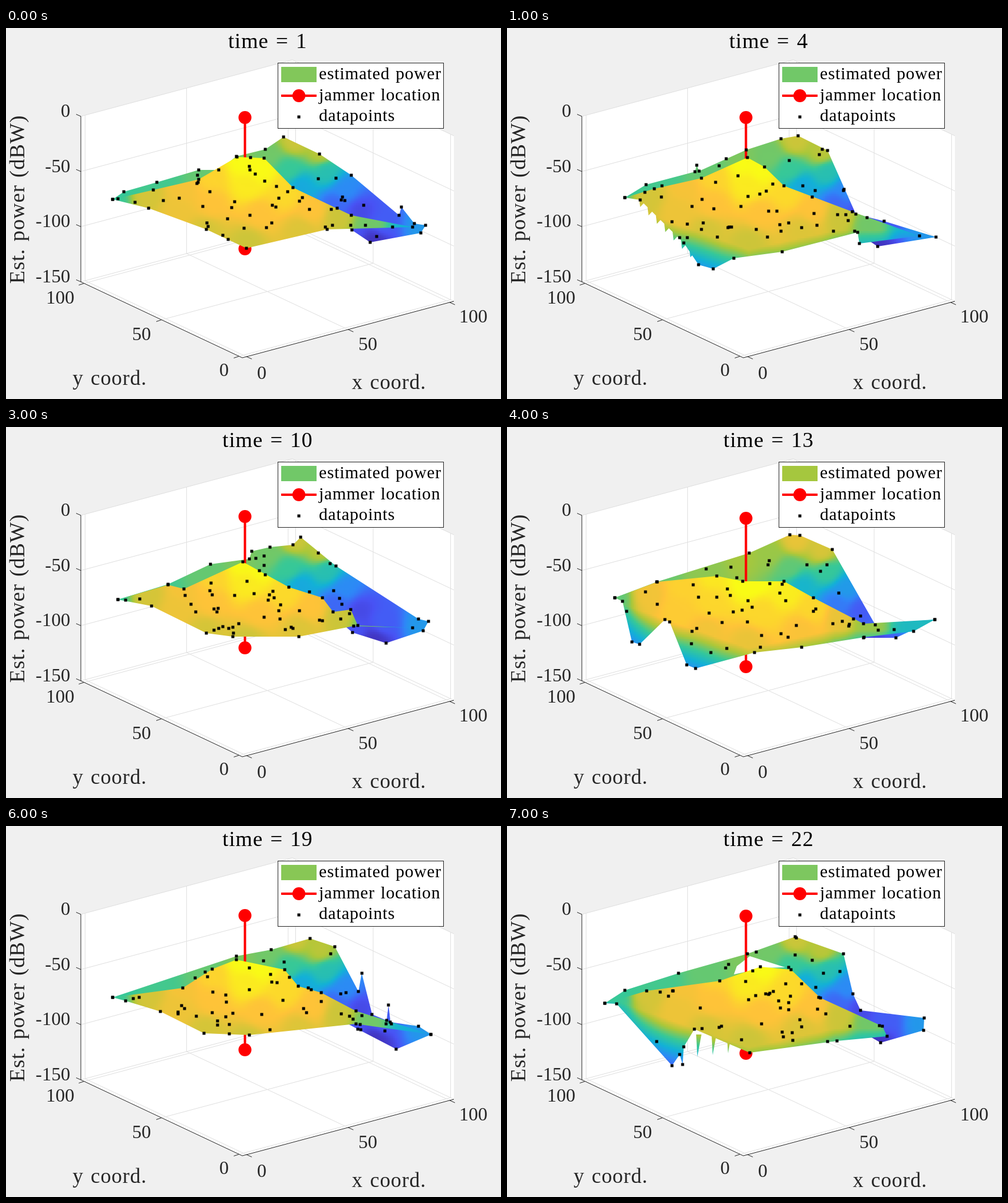
An HTML page with a canvas for the animation above (8 s loop, 840x630 px).

```html
<!DOCTYPE html>
<html lang="en">
<head>
<meta charset="utf-8">
<title>Estimated power over time</title>
<style>
html, body { margin: 0; height: 100%; overflow: hidden; background: #f0f0f0; }
canvas { display: block; }
</style>
</head>
<body>
<canvas id="stage" width="840" height="630"></canvas>
<script>
const ctx = document.getElementById('stage').getContext('2d');
const STEP = 1000, JAMMER_X = 405.5, CELL = 3;
const scenes = [];

// Outlines are flat [x, y, ...] lists, clockwise from the left corner.
function scene(time, back, front, options) {
  scenes.push({ time, back, front, patch: 4.5, top: 152, base: 375, warmth: 0, ...options });
}

// A neighbouring measurement: an earlier outline stretched about the jammer.
function stretched(time, from, left, right, options) {
  const warp = (v, i) => i % 2 ? v : JAMMER_X + (v - JAMMER_X) * (v < JAMMER_X ? left : right);
  scene(time, from.back.map(warp), from.front.map(warp), options);
}

scene(1,
  [181,291, 200,278, 256,262, 327,241, 361,241, 391,218, 440,206, 471,185, 532,214, 586,250, 667,318, 671,304,
    693,332, 712,335, 704,348, 618,364],
  [181,291, 250,275, 327,257, 392,219, 438,221, 487,271, 586,318, 690,338, 545,342, 408,374, 340,342, 242,306],
  { patch: 4.65 });
scene(4,
  [200,288, 236,266, 319,244, 322,233, 326,243, 406,207, 465,188, 494,183, 544,208, 592,316, 640,328, 728,355,
    629,371, 590,345],
  [200,288, 250,273, 330,255, 408,220, 437,236, 470,268, 586,312, 700,353, 598,366, 595,347, 467,380, 385,391,
    350,409, 325,402, 300,365, 226,292],
  { teeth: { x: 226, y: 304, dx: 14.2, dy: 14.2, count: 7, length: 16, width: 15 } });
scene(10,
  [190,293, 275,267, 347,233, 413,224, 417,211, 448,204, 487,200, 500,187, 560,236, 700,326, 717,330, 708,346,
    645,367, 588,349],
  [190,293, 275,268, 302,275, 402,229, 480,272, 537,290, 555,314, 585,310, 597,337, 690,341, 590,338, 497,356,
    385,356, 340,350, 247,304]);
scene(13,
  [183,290, 254,263, 411,214, 480,183, 497,184, 552,208, 625,336, 726,327, 660,358, 605,358],
  [183,290, 255,263, 356,253, 400,262, 470,262, 520,290, 605,334, 726,327, 690,347, 606,357, 500,374, 420,383,
    320,410, 305,404, 276,331, 268,327, 225,369, 212,365, 196,296],
  { patch: 4.95, top: 155, base: 407, warmth: .35 });
scene(16,
  [181,291, 391,221, 446,210, 505,191, 543,205, 579,281, 584,250, 600,320, 622,330, 625,304, 628,333, 671,340,
    690,354, 637,379, 578,345],
  [181,291, 300,275, 350,243, 391,227, 466,244, 487,272, 522,283, 575,314, 690,354, 575,336, 412,355, 336,352,
    262,315, 203,297],
  { patch: 4.85, base: 378 });
scene(22,
  [166,301, 200,279, 291,250, 408,217, 489,188, 571,217, 587,285, 600,313, 708,326, 707,347, 634,368],
  [166,301, 237,280, 361,263, 430,239, 482,244, 532,292, 637,340, 645,357, 560,365, 412,385, 318,345, 300,375,
    298,405, 293,388, 280,407, 186,302],
  { patch: 4.6, top: 153, base: 386, hole: [385,252, 390,238, 412,221, 472,240, 435,241],
    teeth: { x: 323, y: 392, dx: 26, dy: -3, count: 3, length: 38, width: 7 } });
stretched(7, scenes[2], 1.13, 1.005);
stretched(19, scenes[4], 1, 1.11, { patch: 4.7, base: 380 });
scenes.sort((a, b) => a.time - b.time);

// Power samples [x, y, value 0..7] shared by all scenes.
const FRONT_HEAT = [185,292,4, 240,285,5.5, 300,272,5.9, 290,310,5.8, 350,250,6.3, 400,228,7, 430,240,7, 410,268,6.7,
  475,280,6.4, 350,300,6, 430,315,6, 520,308,6, 340,345,5.5, 410,365,5.4, 500,345,5.6, 565,322,5.4, 610,335,4.5, 690,340,3];
const BACK_HEAT = [190,290,4, 256,265,4.1, 340,243,4.4, 400,220,4.6, 445,215,4.5, 490,192,5.4, 535,212,5.2, 480,240,4,
  545,245,3.6, 500,270,2.8, 575,275,2.1, 560,300,1.4, 600,312,.8, 625,365,.3, 640,330,1.2, 705,335,2.4, 590,340,1];

const PALETTE = [[62,38,168], [72,82,244], [46,135,247], [18,177,214], [55,200,151], [171,199,57], [254,195,56], [249,251,21]];
function colour(value) {
  const v = Math.max(0, Math.min(7, value)), i = Math.min(6, Math.floor(v)), f = v - i;
  return `rgb(${PALETTE[i].map((c, k) => Math.round(c + (PALETTE[i + 1][k] - c) * f))})`;
}

function heatAt(x, y, heat) {
  let sum = 0, total = 0;
  for (let i = 0; i < heat.length; i += 3) {
    const d = (x - heat[i]) ** 2 + (y - heat[i + 1]) ** 2 + 150, w = 1 / (d * d);
    sum += w * heat[i + 2];
    total += w;
  }
  return sum / total;
}

// Power falls off where the sheet hangs below its usual front edge.
function droop(x, y) {
  const edge = x < 410 ? 293 + (x - 185) * .35 : Math.max(340, 372 - (x - 410) * .22);
  return Math.max(0, y - edge - 4) / 18;
}

function pathOf(points) {
  const path = new Path2D();
  for (let i = 0; i < points.length; i += 2) path.lineTo(points[i], points[i + 1]);
  return path;
}

function frontPath(s) {
  const path = pathOf(s.front);
  path.closePath();
  if (s.teeth) {
    const { x, y, dx, dy, count, length, width } = s.teeth;
    for (let i = 0; i < count; i++) {
      const tx = x + i * dx, ty = y + i * dy;
      path.moveTo(tx - 2, ty - length);
      path.lineTo(tx + width, ty - length);
      path.lineTo(tx, ty);
      path.closePath();
    }
  }
  return path;
}

function line(stroke, width, ...points) {
  ctx.strokeStyle = stroke;
  ctx.lineWidth = width;
  ctx.stroke(pathOf(points));
}

function sheet(path, valueAt) {
  ctx.save();
  ctx.clip(path);
  for (let y = 180; y < 414; y += CELL)
    for (let x = 156; x < 732; x += CELL) {
      if (!ctx.isPointInPath(path, x, y) && !nearPath(path, x, y)) continue;
      ctx.fillStyle = colour(valueAt(x + CELL / 2, y + CELL / 2));
      ctx.fillRect(x, y, CELL, CELL);
    }
  ctx.restore();
}

function nearPath(path, x, y) {
  ctx.lineWidth = 3 * CELL;
  return ctx.isPointInStroke(path, x, y);
}

function text(str, x, y, size, align = 'left', fill = '#262626') {
  ctx.font = `${size}px "Liberation Serif", "Times New Roman", serif`;
  ctx.letterSpacing = /[a-z]/.test(str) ? `${size * 0.027}px` : '0px';
  ctx.wordSpacing = `${size * 0.06}px`;
  ctx.textAlign = align;
  ctx.fillStyle = fill;
  ctx.fillText(str, x, y);
}

function ball(x, y) {
  ctx.beginPath();
  ctx.arc(x, y, 11, 0, 7);
  ctx.fillStyle = '#f00';
  ctx.fill();
}

function dot(x, y) {
  ctx.fillStyle = '#000';
  ctx.fillRect(Math.round(x) - 2.5, Math.round(y) - 2.5, 5, 5);
}

// Outline corners are measurements; the rest scatter over the visible sheets.
function dots(s, back, front) {
  for (const list of [s.back, s.front])
    for (let i = 0; i < list.length; i += 2) dot(list[i], list[i + 1]);
  let seed = s.time * 7919;
  const random = () => (seed = seed * 16807 % 2147483647) / 2147483647;
  let onFront = 38, onBack = 10;
  for (let tries = 0; tries < 2000 && onFront + onBack > 0; tries++) {
    const x = 180 + random() * 540, y = 185 + random() * 200;
    if (ctx.isPointInPath(front, x, y)) {
      if (onFront-- > 0) dot(x, y); else onFront = 0;
    } else if (ctx.isPointInPath(back, x, y)) {
      if (onBack-- > 0) dot(x, y); else onBack = 0;
    }
  }
}

// Box coordinates 0..1 along x, y and height.
const project = (a, b, h) => [401 + 359 * a - 274 * b, 560 - 96 * a - 129 * b - 281 * h];

function axes() {
  ctx.fillStyle = '#f0f0f0';
  ctx.fillRect(0, 0, 840, 630);
  ctx.fillStyle = '#fff';
  ctx.fill(pathOf([[0, 1, 1], [1, 1, 1], [1, 0, 1], [1, 0, 0], [0, 0, 0], [0, 1, 0]].flatMap(p => project(...p))));

  const edge = (stroke, ...corners) => line(stroke, 1, ...corners.flatMap(p => project(...p)));
  const tick = ([x, y], dx, dy) => line('#262626', 1, x, y, x + dx, y + dy);
  const grid = '#dfdfdf', ink = '#262626';
  for (const h of [0, 1 / 3, 2 / 3, 1]) edge(grid, [0, 1, h], [1, 1, h], [1, 0, h]);
  for (const t of [.02, .5, .98]) {
    edge(grid, [t, 0, 0], [t, 1, 0], [t, 1, 1]);
    edge(grid, [0, t, 0], [1, t, 0], [1, t, 1]);
  }
  edge(ink, [0, 1, 1], [0, 1, 0], [0, 0, 0], [1, 0, 0]);
  for (const h of [0, 1 / 3, 2 / 3, 1]) tick(project(0, 1, h), -8, -3.5);
  for (const t of [.02, .5, .98]) {
    tick(project(t, 0, 0), 9, 4);
    tick(project(0, t, 0), -9, 3);
  }

  ['0', '-50', '-100', '-150'].forEach((s, i) => text(s, 109, 151 + i * 93.7, 32, 'right'));
  text('100', 116, 468, 32, 'right');
  text('50', 246, 530, 32, 'right');
  text('0', 378, 591, 32, 'right');
  text('0', 426, 596, 32);
  text('50', 598, 547, 32);
  text('100', 769, 500, 32);
  text('y coord.', 113, 606, 35.5);
  text('x coord.', 587, 613, 35.5);
  ctx.save();
  ctx.translate(31, 291);
  ctx.rotate(-Math.PI / 2);
  text('Est. power (dBW)', 0, 0, 36.5, 'center');
  ctx.restore();
}

function legend(patch) {
  ctx.fillStyle = '#fff';
  ctx.fillRect(461, 59, 282, 112);
  ctx.strokeStyle = '#262626';
  ctx.lineWidth = 1;
  ctx.strokeRect(461.5, 59.5, 281, 111);
  ctx.fillStyle = colour(patch);
  ctx.fillRect(467, 66, 60, 26);
  line('#f00', 4, 467, 115, 527, 115);
  ball(497, 115);
  dot(497, 151);
  ['estimated power', 'jammer location', 'datapoints'].forEach((s, i) => text(s, 531, 87 + i * 35.7, 29.5, 'left', '#000'));
}

function draw(s) {
  const back = pathOf([...s.back, 560, 325, 440, 268]), front = frontPath(s);
  axes();
  text(`time = ${s.time}`, 444, 34, 36.5, 'center', '#000');
  sheet(back, (x, y) => heatAt(x, y, BACK_HEAT) + s.warmth);
  if (s.hole) {
    ctx.fillStyle = '#fff';
    ctx.fill(pathOf(s.hole));
  }
  line('#f00', 4, JAMMER_X, s.top, JAMMER_X, s.base);
  ball(JAMMER_X, s.top);
  ball(JAMMER_X, s.base);
  sheet(front, (x, y) => heatAt(x, y, FRONT_HEAT) + s.warmth - droop(x, y));
  dots(s, back, front);
  legend(s.patch);
}

let shown = -1;
const start = performance.now();
function tick() {
  const index = Math.floor((performance.now() - start) / STEP) % scenes.length;
  if (index !== shown) draw(scenes[shown = index]);
  requestAnimationFrame(tick);
}
tick();
</script>
</body>
</html>
```
